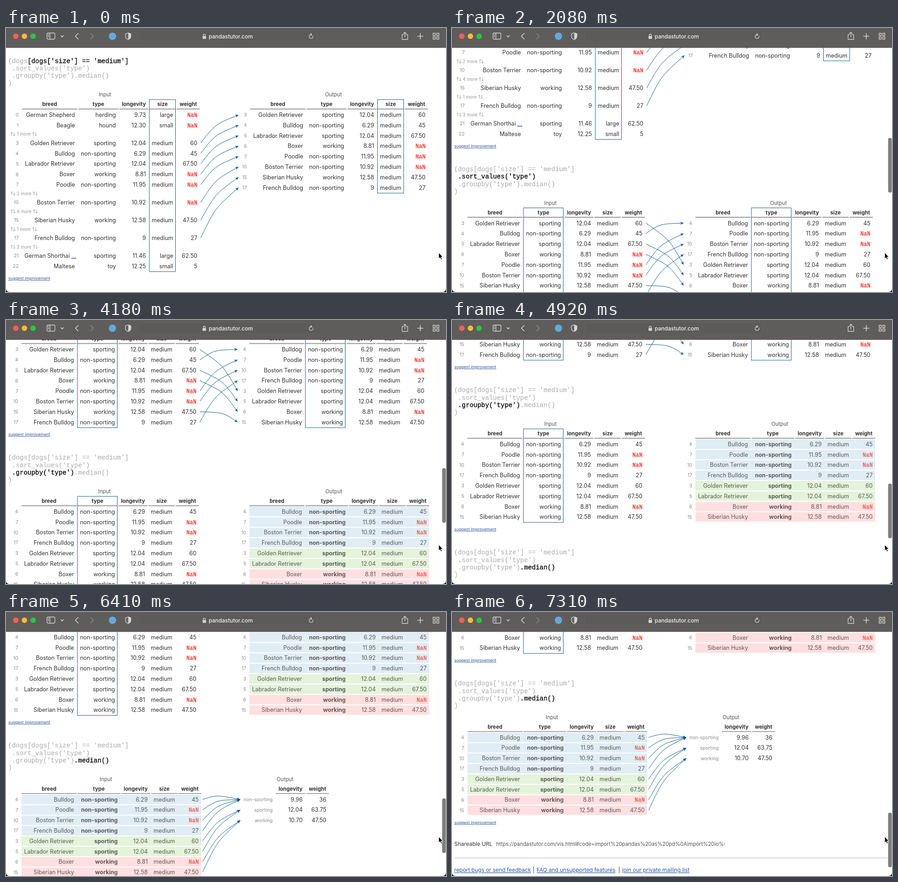
Recreate the animation shown at these times as an HTML page. Size 967 by 579 pixels, loop 8 s.

```html
<!DOCTYPE html>
<html lang="en">
<head>
<meta charset="utf-8">
<title>Table steps</title>
<style>
  html, body { margin: 0; width: 100%; height: 100%; overflow: hidden; background: #000; }
  svg { display: block; }
  text { font: 12.5px Inter, "Open Sans", sans-serif; fill: #333; }
  .title { font-size: 11.5px; fill: #555; }
  .head { font-size: 11.5px; font-weight: 700; }
  .idx { font-size: 10.4px; fill: #8c8c8c; }
  .more { font-size: 9.8px; fill: #999; }
  .nan { font: 12.2px "Liberation Mono", monospace; fill: #f0271d; stroke: #f0271d; stroke-width: .3; }
  .code { font: 14.25px "Liberation Mono", monospace; fill: #aaa; }
  .on { fill: #000; stroke: #000; stroke-width: .3; }
  .bold { font-weight: 700; }
  .link { fill: #2f55a4; text-decoration: underline; }
  .small { font-size: 9px; }
  .foot { font-size: 12px; }
  .url { font-size: 11.4px; fill: #555; }
  .dim text { opacity: .78; }
  .rule { stroke: #8a8a8a; stroke-width: 1.6; }
  .blue { fill: none; stroke: #0b5c8f; }
  .swap { fill: none; stroke: #999; stroke-width: .9; }
  .icon { fill: none; stroke: #d6d5d4; stroke-width: 1.3; stroke-linecap: round; stroke-linejoin: round; }
  .host { font-size: 12px; font-weight: 500; fill: #f2f2f2; }
</style>
</head>
<body>
<svg width="967" height="579" viewBox="0 0 967 579">
  <defs>
    <marker id="tip" markerUnits="userSpaceOnUse" markerWidth="10" markerHeight="10"
      viewBox="-8 -5 10 10" refX="0" refY="0" orient="auto">
      <path d="M0 0L-7.5 -3.4L-5 0L-7.5 3.4Z" fill="#0b5c8f"/>
    </marker>
    <clipPath id="win"><path d="M0 0H967V571Q967 579 959 579H8Q0 579 0 571Z"/></clipPath>
    <clipPath id="field"><rect x="97" y="1650" width="502" height="30"/></clipPath>
  </defs>
  <g clip-path="url(#win)">
    <rect width="967" height="579" fill="#fff"/>
    <g id="page"></g>
    <rect id="bar" x="958.5" width="8" height="120" rx="4" fill="#7d7d7d"/>
    <rect width="967" height="43" fill="#5f5d5c"/>
    <path d="M0 43H967" stroke="#4c4a49"/>
    <rect x="291.5" y="5.5" width="390" height="25" rx="5" fill="#5d5b5a" stroke="#646261"/>
    <circle cx="21.5" cy="18" r="6" fill="#ff5f57"/>
    <circle cx="40.5" cy="18" r="6" fill="#febc2e"/>
    <circle cx="59.5" cy="18" r="6" fill="#28c840"/>
    <g class="icon">
      <rect x="90" y="11" width="17.5" height="13.5" rx="2.5"/>
      <path d="M96.5 11V24.5M92.3 14.2H94.2M92.3 16.8H94.2M92.3 19.4H94.2"/>
      <path d="M120.8 16.8L123.5 19.6L126.2 16.8" stroke-width="1.6"/>
      <path d="M158.5 12L152.5 18L158.5 24" stroke-width="1.6"/>
      <path d="M186 12L192 18L186 24" stroke="#8a8887" stroke-width="1.6"/>
      <path d="M268.5 10.5L274.5 12.8V18Q274.5 23 268.5 25.5Q262.5 23 262.5 18V12.8Z"/>
      <path d="M268.5 10.5L274.5 12.8V18Q274.5 23 268.5 25.5Z" fill="#d6d5d4" stroke="none"/>
      <path d="M433.5 18V15.8A2.3 2.3 0 0 1 438.1 15.8V18"/>
      <rect x="432.6" y="18.2" width="6.4" height="5" rx=".8" fill="#d6d5d4"/>
      <path d="M674.6 17.2A4.3 4.3 0 1 1 671.5 14.4M669.8 12L672.2 14.4L669.8 16.6"/>
      <path d="M873.5 14.5H870.5V25H882.8V14.5H879.8M876.6 20V9.5M873.6 12.2L876.6 9.2L879.6 12.2"/>
      <path d="M910.5 12V24M904.5 18H916.5" stroke-width="1.6"/>
      <path d="M938.5 11.5H943.5V16.5H938.5ZM946.5 11.5H951.5V16.5H946.5ZM938.5 19.5H943.5V24.5H938.5ZM946.5 19.5H951.5V24.5H946.5Z"/>
    </g>
    <circle cx="234" cy="18" r="8" fill="#64a9da"/>
    <text class="host" x="445.5" y="23">pandastutor.com</text>
    <path d="M951 493V506L954 503.3L956 508L958.2 507L956.2 502.4H960Z" fill="#000" stroke="#fff" stroke-width=".9"/>
  </g>
</svg>
<script>
const dogs = {
  0: ['German Shepherd', 'herding', '9.73', 'large', 'NaN'],
  1: ['Beagle', 'hound', '12.30', 'small', 'NaN'],
  3: ['Golden Retriever', 'sporting', '12.04', 'medium', '60'],
  4: ['Bulldog', 'non-sporting', '6.29', 'medium', '45'],
  5: ['Labrador Retriever', 'sporting', '12.04', 'medium', '67.50'],
  6: ['Boxer', 'working', '8.81', 'medium', 'NaN'],
  7: ['Poodle', 'non-sporting', '11.95', 'medium', 'NaN'],
  10: ['Boston Terrier', 'non-sporting', '10.92', 'medium', 'NaN'],
  15: ['Siberian Husky', 'working', '12.58', 'medium', '47.50'],
  17: ['French Bulldog', 'non-sporting', '9', 'medium', '27'],
  21: ['German Shorthai', 'sporting', '11.46', 'large', '62.50'],
  22: ['Maltese', 'toy', '12.25', 'small', '5']
};
const medians = {
  'non-sporting': ['9.96', '36'],
  sporting: ['12.04', '63.75'],
  working: ['10.70', '47.50']
};
const tints = { 'non-sporting': '#e1edf5', sporting: '#e4f3db', working: '#ffdfdf' };
const names = ['breed', 'type', 'longevity', 'size', 'weight'];
const medium = [3, 4, 5, 6, 7, 10, 15, 17];
const sorted = [4, 7, 10, 17, 3, 5, 6, 15];
const firstIn = [0, 1, '1 more', 3, 4, 5, 6, 7, '2 more', 10, '4 more', 15, '1 more', 17, '3 more', 21, 22];
const wide = [122, 88, 64, 58, 51], plain = [121, 88, 64, 58, 51], grouped = [121, 94, 64, 58, 50];
const PITCH = 22.8, GAP = 39, TOP = 190.5;

const text = (x, y, s, cls = '', anchor = 'start') =>
  `<text x="${x}" y="${y}" class="${cls}" text-anchor="${anchor}">${s}</text>`;

const swap = (x, y) =>
  `<path class="swap" d="M${x + 2.6} ${y + 4}v-8m-2.4 2.6l2.4 -2.6l2.4 2.6M${x + 8} ${y - 4}v8m-2.4 -2.6l2.4 2.6l2.4 -2.6"/>`;

function moreRow(label, y) {
  const shift = label[0] === '1' ? 0 : 1.6;
  return swap(10, y) + text(39 + shift / 2, y + 3.6, label, 'more', 'middle') + swap(57.5 + shift, y);
}

// Draws a table; row ids without data stand for hidden rows.
function table({ x, widths, rows, title, label, box, tinted, data = dogs, cols = names }) {
  let out = text(title, 150, label, 'title', 'middle');
  const edges = [];
  let left = x;
  cols.forEach((name, i) => {
    const right = left + widths[i];
    edges.push([left, right]);
    out += text((left + right) / 2, 171.2, name, 'head', 'middle') +
      `<path class="rule" d="M${left} 177.6H${right}"/>`;
    left = right + 2;
  });
  const end = left - 2, at = {};
  let y = TOP, last = TOP;
  for (const id of rows) {
    const row = data[id];
    if (!row) {
      out += moreRow(id, y - 3.3);
      y += GAP - PITCH;
      continue;
    }
    at[id] = last = y;
    if (tinted) out += `<rect x="${x}" y="${y - 10.4}" width="${end - x}" height="20.8" fill="${tints[row[1]]}"/>`;
    out += text(x - 7.2, y + 3.8, id, 'idx', 'end') + `<g class="${tinted ? 'dim' : ''}">`;
    row.forEach((v, i) => {
      const right = edges[i][1] - 5.5;
      if (id === 21 && i === 0) out += text(right + 3, y + 4.5, v + ' <tspan class="link">...</tspan>', '', 'end');
      else out += text(right, y + 4.5, v, v === 'NaN' ? 'nan' : tinted && i === 1 ? 'bold' : '', 'end');
    });
    out += '</g>';
    y += PITCH;
  }
  if (box) {
    const [a, b] = edges[box];
    out += `<rect class="blue" x="${a}" y="157" width="${b - a - .5}" height="${last + 12 - 157}"/>`;
  }
  return { out, at, last };
}

// Both handles share one point, a fixed step off the middle: up, and away from the slope.
function arrow(x, y1, y2) {
  const dx = 83, bend = 10;
  const cx = x + dx / 2 + (y2 > y1 ? bend : -bend), cy = (y1 + y2) / 2 - bend;
  return `<path class="blue" marker-end="url(#tip)" d="M${x} ${y1}C${cx} ${cy} ${cx} ${cy} ${x + dx} ${y2}"/>`;
}

const code = [
  [0, 0, '(dogs'], [5, 0, "[dogs['size'] == 'medium']", 0], [1, 1, ".sort_values('type')", 1],
  [1, 2, ".groupby('type')", 2], [17, 2, '.median()', 3], [0, 3, ')']
];

function section(top, step, input, output, link) {
  const a = table({ label: 'Input', ...input }), b = table({ label: 'Output', ...output });
  let out = code.map(([col, row, s, n]) =>
    text(4.5 + col * 8.55, 76.6 + row * 16.25, s, n === step ? 'code on' : 'code')).join('');
  out += a.out + b.out;
  if (link) {
    for (const id in a.at) {
      const y = b.at[link.to(id)];
      if (y) out += arrow(link.x, a.at[id], y);
    }
  }
  out += text(5, a.last + 29.8, 'suggest improvement', 'link small');
  return `<g transform="translate(0 ${top})">${out}</g>`;
}

const same = id => id;
const footer = 1724.8;
const page = document.getElementById('page');
page.innerHTML =
  section(0, 0,
    { x: 35, widths: wide, rows: firstIn, title: 217.5, box: 3 },
    { x: 536.5, widths: wide, rows: medium, title: 719.7, box: 3 },
    { x: 428, to: same }) +
  section(527.5, 1,
    { x: 34, widths: plain, rows: medium, title: 216.3, box: 1 },
    { x: 535, widths: plain, rows: sorted, title: 717.5, box: 1 },
    { x: 426, to: same }) +
  section(883.3, 2,
    { x: 34, widths: plain, rows: sorted, title: 216.3, box: 1 },
    { x: 535, widths: grouped, rows: sorted, title: 720.5, tinted: true }) +
  section(1239.2, 3,
    { x: 34, widths: grouped, rows: sorted, title: 219.5, tinted: true },
    { x: 593, widths: [64.5, 50], rows: Object.keys(medians), title: 613.3, data: medians, cols: ['longevity', 'weight'] },
    { x: 432, to: id => dogs[id][1] }) +
  text(5, 1667, 'Shareable URL', 'foot') +
  `<g clip-path="url(#field)">${text(97, 1667, 'https://pandastutor.com/vis.html#code=import%20pandas%20as%20pd%0Aimport%20io%0A%0Acsv', 'url')}</g>` +
  '<path d="M5 1694H957" stroke="#ccc" stroke-width="1.5"/>' +
  text(5, footer, 'report bugs or send feedback', 'foot link') + text(179.5, footer, '|', 'foot', 'middle') +
  text(186, footer, 'FAQ and unsupported features', 'foot link') + text(367.5, footer, '|', 'foot', 'middle') +
  text(374, footer, 'join our private mailing list', 'foot link');

// Scroll position held from each time on.
const scroll = [
  [0, 0], [1200, 12], [1345, 90], [1490, 190], [1635, 245], [1780, 268],
  [2080, 290], [2230, 352], [2380, 408], [2530, 433], [2680, 440],
  [3430, 455], [3580, 525], [3730, 595], [3880, 632], [4030, 648], [4180, 653.5],
  [4480, 675], [4630, 745], [4770, 788], [4920, 801.5],
  [6120, 830], [6270, 930], [6410, 1018.5], [6560, 1078], [6710, 1115],
  [6860, 1137], [7010, 1148], [7160, 1153], [7310, 1154.5]
];
const bar = document.getElementById('bar');
const start = performance.now();

function draw() {
  const t = (performance.now() - start) % 8000;
  const pos = scroll.findLast(k => k[0] <= t)[1];
  page.setAttribute('transform', `translate(0 ${-pos})`);
  bar.setAttribute('y', 174.2 + pos * .2302);
  const hidden = t < 1200 || (t >= 5820 && t < 6120);
  bar.setAttribute('opacity', hidden ? 0 : t >= 5670 && t < 5820 ? .4 : 1);
  requestAnimationFrame(draw);
}
draw();
</script>
</body>
</html>
```
